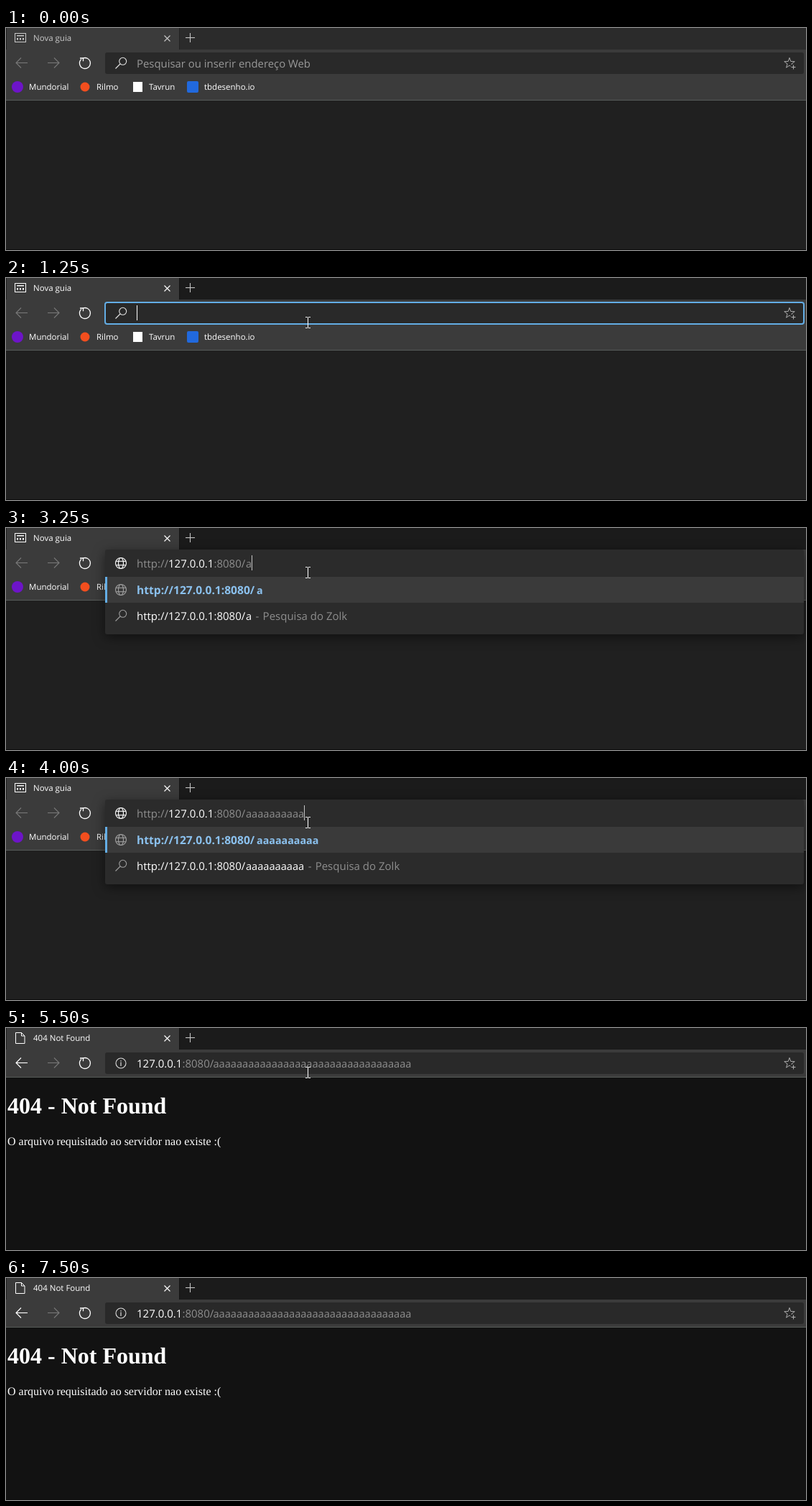
An HTML page with a canvas that plays this animation: 1114 px wide and 309 px high, repeating every 8250 ms.

```html
<!DOCTYPE html>
<html lang="pt-BR">
<head>
<meta charset="utf-8">
<title>Nova guia</title>
<style>
  html, body { margin: 0; width: 100%; height: 100%; overflow: hidden; background: #202020; }
  canvas { display: block; width: 100%; height: 100%; }
</style>
</head>
<body>
<canvas id="stage" width="1114" height="309"></canvas>
<script>
const W = 1114, H = 309, LOOP = 8250;
const ctx = document.getElementById('stage').getContext('2d');
const SANS = '"Open Sans", "Noto Sans", sans-serif';
const SERIF = '"Liberation Serif", serif';
const UI = '11.5px ' + SANS, BAR = '15px ' + SANS, KEYS = '14.6px ' + SANS;
const BOLD = 'bold 15.6px ' + SANS, BOLD_KEYS = 'bold 14.3px ' + SANS;
const WHITE = '#fff', GREY = '#8e8e8e', DIM = '#777', BLUE = '#63ade5', LINK = '#8bc1ee';
const TOOLBAR = '#3b3b3b', FIELD = '#292929';

// [start time, value]: each value holds until the next one
const TYPED = [[0, 0], [3250, 1], [3750, 2], [4000, 10], [4250, 17], [4500, 25], [4750, 33], [5000, 34]];
const CARET = [[0, false], [1250, true], [1750, false], [2000, true], [2500, false], [3000, true]];
const POINTER = [
  [0, null], [250, ['arrow', 420, 129]], [500, ['arrow', 411, 99]], [750, ['arrow', 413, 76]],
  [1000, ['arrow', 420, 62]], [1250, ['beam', 420, 62]], [6750, ['arrow', 531, 124]],
  [7000, ['arrow', 606, 229]], [7250, ['arrow', 592, 298]], [7500, null]
];

function at(steps, t) {
  let value = steps[0][1];
  for (const [start, v] of steps) if (t >= start) value = v;
  return value;
}

function rect(x, y, w, h, color) {
  ctx.fillStyle = color;
  ctx.fillRect(x, y, w, h);
}

function round(x, y, w, h, r, color) {
  ctx.beginPath();
  ctx.roundRect(x, y, w, h, r);
  ctx.fillStyle = color;
  ctx.fill();
}

function disc(x, y, r, color) {
  ctx.beginPath();
  ctx.arc(x, y, r, 0, 7);
  ctx.fillStyle = color;
  ctx.fill();
}

// Draws text and returns the x where it ends
function text(s, x, y, font, color) {
  ctx.font = font;
  ctx.fillStyle = color;
  ctx.fillText(s, x, y);
  return x + ctx.measureText(s).width;
}

function line(color, points, width = 1.1, close = false) {
  ctx.beginPath();
  points.forEach(([x, y]) => ctx.lineTo(x, y));
  if (close) ctx.closePath();
  ctx.strokeStyle = color;
  ctx.lineWidth = width;
  ctx.stroke();
}

function ring(x, y, rx, ry, color, from = 0, to = 2 * Math.PI, width = 1.1) {
  ctx.beginPath();
  ctx.ellipse(x, y, rx, ry, 0, from, to);
  ctx.strokeStyle = color;
  ctx.lineWidth = width;
  ctx.stroke();
}

function cross(x, y, r, color) {
  line(color, [[x - r, y - r], [x + r, y + r]]);
  line(color, [[x + r, y - r], [x - r, y + r]]);
}

function navArrow(x, y, dir, color) {
  line(color, [[x - 8 * dir, y], [x + 8 * dir, y]]);
  line(color, [[x - dir, y - 7], [x - 8 * dir, y], [x - dir, y + 7]]);
}

function reload(x, y) {
  ring(x, y, 7.5, 7.5, WHITE, -1.9, 3.95, 1.3);
  line(WHITE, [[x - 7, y - 7], [x - 2.5, y - 7], [x - 2.5, y - 2.8]], 1.3);
}

function magnifier(x, y, color) {
  ring(x + 2.7, y - 2.7, 5, 5, color);
  line(color, [[x - 1, y + 1], [x - 7.5, y + 7.5]]);
}

function globe(x, y, color) {
  ring(x, y, 7.5, 7.5, color);
  ring(x, y, 3.5, 7.5, color);
  line(color, [[x - 6.8, y - 2.7], [x + 6.8, y - 2.7]]);
  line(color, [[x - 6.8, y + 2.7], [x + 6.8, y + 2.7]]);
}

function info(x, y) {
  ring(x, y, 7, 7, '#ddd');
  rect(x - 0.6, y - 1.5, 1.2, 5.5, '#ddd');
  rect(x - 0.6, y - 4, 1.2, 1.4, '#ddd');
}

function star(x, y) {
  const points = [];
  for (let i = 0; i < 10; i++) {
    const r = i % 2 ? 3.1 : 7.6, a = (i / 5 - 0.5) * Math.PI;
    points.push([x + r * Math.cos(a), y + r * Math.sin(a)]);
  }
  line('#aaa', points, 1, true);
  rect(x + 1.5, y + 2, 8, 7, FIELD);
  line('#aaa', [[x + 2.5, y + 5.5], [x + 8.5, y + 5.5]]);
  line('#aaa', [[x + 5.5, y + 2.5], [x + 5.5, y + 8.5]]);
}

function tabIcon(loaded, color) {
  if (loaded) {
    line(color, [[13.5, 6.5], [21.5, 6.5], [26, 11], [26, 21.5], [13.5, 21.5]], 1, true);
    line(color, [[21.5, 6.5], [21.5, 11], [26, 11]], 1);
    return;
  }
  ctx.strokeStyle = color;
  ctx.lineWidth = 1;
  ctx.strokeRect(12.5, 7.5, 15, 12);
  rect(15, 10, 10, 1.4, color);
  for (let i = 0; i < 3; i++) rect(15 + 4 * i, 14, 2, 2.5, color);
}

function frameTop(active, loaded) {
  const ink = active ? WHITE : '#c9c9c9';
  rect(0, 0, W, 30, active ? '#1b1b1b' : '#2b2b2b');
  rect(0, 0, 241, 30, TOOLBAR);
  rect(0, 0, 1, 30, '#1f1f1f');
  rect(241, 0, 1, 30, active ? '#151515' : '#222');
  tabIcon(loaded, ink);
  text(loaded ? '404 Not Found' : 'Nova guia', 38, 18, UI, ink);
  cross(224.5, 14.5, 4, ink);
  line('#c4c4c4', [[250, 13.5], [263, 13.5]]);
  line('#c4c4c4', [[256.5, 7], [256.5, 20]]);

  rect(0, 30, W, loaded ? 38 : 70, TOOLBAR);
  rect(0, loaded ? 68 : 100, W, 1, '#575b59');
  navArrow(22, 48.5, 1, loaded ? WHITE : DIM);
  navArrow(66, 48.5, -1, DIM);
  reload(110, 49);
}

function bookmarks() {
  disc(16, 82, 8, '#6d14c8');
  text('Mundorial', 32, 86, UI, WHITE);
  disc(110, 82, 6.5, '#f24e1e');
  text('Rilmo', 126, 86, UI, WHITE);
  rect(177, 75, 13, 14, WHITE);
  text('Tavrun', 199, 86, UI, WHITE);
  round(252, 74, 16, 16, 2, '#2169dd');
  text('tbdesenho.io', 276, 86, UI, WHITE);
}

function field(t) {
  const focused = t >= 1250 && t < 2000;
  round(138, 34, 973, 30, 3, t >= 1000 && t < 1250 ? '#303030' : FIELD);
  if (focused) {
    ctx.beginPath();
    ctx.roundRect(138, 34, 973, 30, 3);
    ctx.strokeStyle = BLUE;
    ctx.lineWidth = 2;
    ctx.stroke();
  }
  star(1091, 49);
  if (t >= 5500) {
    info(160, 49);
    address(182, 288.5, 34, '');
    return;
  }
  magnifier(160, 49, '#e6e6e6');
  if (!focused) text('Pesquisar ou inserir endereço Web', 182, 55, '14.9px ' + SANS, '#999');
}

function address(x, keysX, n, scheme) {
  x = text(scheme, x, 55, BAR, GREY);
  x = text('127.0.0.1', x, 55, BAR, WHITE);
  text(':8080/', x, 55, BAR, GREY);
  return text('a'.repeat(n), keysX, 55, KEYS, GREY);
}

function boldUrl(x, tail) {
  x = text('http://', x, 92, BOLD, LINK);
  x = text('127.0.0.1', x, 92, BOLD, LINK);
  text(tail, x, 92, BOLD, LINK);
}

function dropdown(t, n) {
  ctx.save();
  ctx.shadowColor = 'rgba(0,0,0,.5)';
  ctx.shadowBlur = 16;
  ctx.shadowOffsetY = 4;
  round(138, 30, 973, 118, 3, '#2b2b2b');
  ctx.restore();
  rect(138, 68, 973, 36, '#3a3a3a');
  rect(138, 68, 3, 36, BLUE);

  globe(160, 49, WHITE);
  const end = address(182, 334, n, 'http://');
  if (at(CARET, t)) rect(Math.round(end), 38, 1, 21, '#c4c4c4');

  globe(160, 86, '#a0a0a0');
  if (n) {
    boldUrl(182, ':8080/');
    text('a'.repeat(n), 349, 92, BOLD_KEYS, LINK);
  } else {
    text('Home', 182, 92, BAR, WHITE);
    text('-', 230, 92, BAR, '#999');
    boldUrl(241, ':8080');
    cross(1091, 86, 4.5, '#ddd');
  }

  magnifier(160, 122, '#a0a0a0');
  text('http://127.0.0.1:8080/', 182, 128, BAR, WHITE);
  const stop = text('a'.repeat(n), 334, 128, KEYS, WHITE);
  text('-', stop + 5.5, 128, BAR, GREY);
  text('Pesquisa do Zolk', stop + 15.5, 128, BAR, GREY);
}

function pointer(spot) {
  if (!spot) return;
  const [kind, x, y] = spot;
  if (kind === 'beam') {
    rect(x, y - 7, 1, 14, WHITE);
    for (const dy of [-8, 7]) {
      rect(x - 3, y + dy, 3, 1, WHITE);
      rect(x + 1, y + dy, 3, 1, WHITE);
    }
    return;
  }
  const shape = [[0, 0], [0, 16.5], [4, 13], [6.4, 18.4], [9, 17.3], [6.7, 12], [11.5, 12]];
  line('#000', shape.map(([px, py]) => [x + 0.5 + px, y + 0.5 + py]), 1, true);
  ctx.fillStyle = WHITE;
  ctx.fill();
}

function draw(t) {
  const loaded = t >= 5500;
  rect(0, 0, W, H, loaded ? '#121212' : '#202020');
  frameTop(t >= 1250, loaded);
  if (!loaded) bookmarks();
  if (t >= 2000 && !loaded) {
    dropdown(t, at(TYPED, t));
  } else {
    field(t);
    if (!loaded && at(CARET, t)) rect(182, 38, 1, 21, WHITE);
  }
  if (loaded) {
    text('404 - Not Found', 2, 119, 'bold 32px ' + SERIF, WHITE);
    text('O arquivo requisitado ao servidor nao existe :(', 2, 163, '16px ' + SERIF, WHITE);
  }
  rect(0, H - 1, W, 1, '#0c0c0c');
  pointer(at(POINTER, t));
}

ctx.textRendering = 'geometricPrecision';
const begin = performance.now();
function tick() {
  draw((performance.now() - begin) % LOOP);
  requestAnimationFrame(tick);
}
tick();
</script>
</body>
</html>
```
